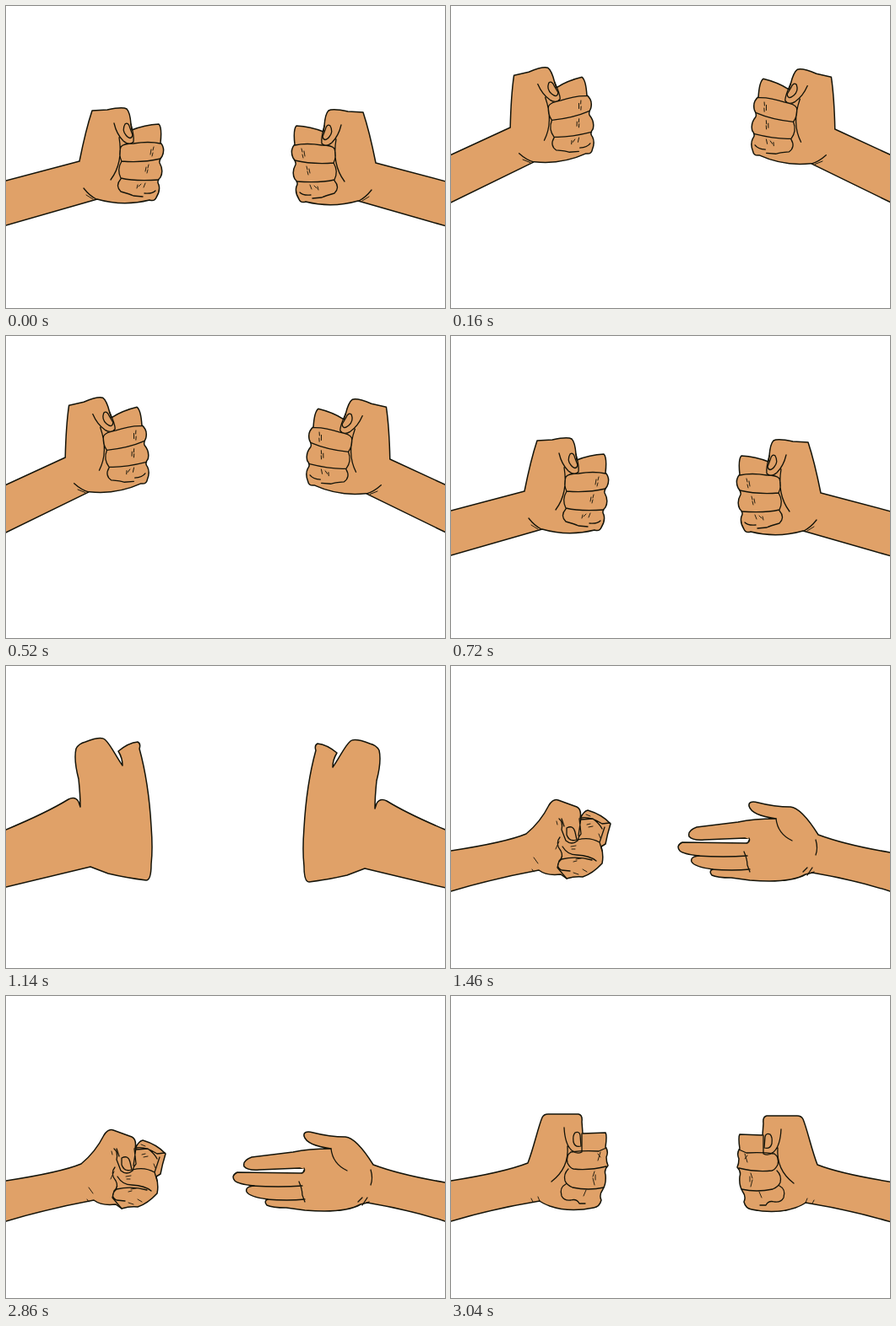
An HTML page for the animation above (3.12 s loop, 520x358 px).

```html
<!DOCTYPE html>
<html lang="en">
<head>
<meta charset="utf-8">
<title>Rock paper scissors</title>
<style>
html, body { margin: 0; width: 100%; height: 100%; overflow: hidden; background: #fff }
svg { display: block; width: 100%; height: 100% }
path { fill: none; stroke: #14140a; stroke-width: 1.3; stroke-linecap: round; stroke-linejoin: round }
.skin { fill: #e0a168; stroke-width: 1.5 }
.fine { stroke-width: .9 }
</style>
</head>
<body>
<svg viewBox="0 0 520 358">
<defs>
  <g id="rest">
    <path class="skin" d="M-60 223L0 207L87 184C91 164 96 142 102 124L120 123Q138 119 143 122Q147 126 148 140L149 147Q164 141 181 140Q185 144 183 162Q189 169 185 178Q181 183 182 186Q187 195 183 203Q178 207 181 212Q183 219 178 227Q176 232 170 230Q139 238 108 229L0 260L-60 278"/>
    <path d="M148 140Q152 155 151 161Q146 166 139 160Q131 152 128 139M134 156Q139 186 124 206M136 167Q139 163 151 163Q169 160 183 163M136 167Q133 176 137 184Q162 186 183 181M137 184Q131 194 136 204Q153 208 181 206M136 205Q129 213 136 220Q147 223 151 225L162 226M164 222Q173 223 177 219M107 229Q99 225 92 216"/>
    <path d="M141 140Q145 137 147 145L150 153Q148 160 142 153Q137 147 141 140"/>
    <path class="fine" d="M175 167L174 171M172 170L171 176M174 174L173 178M169 188L168 192M166 191L165 196M168 194L167 198M165 210L163 215M160 211L157 214M156 212L155 216M95 224L103 229"/>
  </g>
  <g id="down">
    <path class="skin" d="M-60 228L0 219Q63 209 91 198C98 180 103 156 108 144Q110 140 115 140L151 140Q156 141 155 149L156 163L183 162Q185 165 183 179Q187 184 184 191Q184 197 186 201Q181 206 183 212Q184 222 180 229Q175 236 178 242Q176 250 169 251Q140 257 117 249Q109 246 105 243Q50 252 0 267L-60 282"/>
    <path d="M155 163L155 185Q149 188 143 183Q135 176 134 156M138 178Q140 204 119 220M142 185Q156 183 175 184L184 180M142 185Q136 189 138 198Q141 204 145 205Q164 207 184 202M139 205Q133 211 135 219Q137 224 144 227Q163 231 181 227M136 223Q128 227 131 237Q134 243 142 242Q149 240 152 246L159 246"/>
    <path d="M147 162Q152 160 153 165L154 178Q147 180 145 173Q144 165 147 162"/>
    <path class="fine" d="M177 185L174 195M174 187L177 191M170 208L168 214M168 216L170 224M171 212L171 218M160 230L157 237M103 238L105 243M95 240L97 244"/>
  </g>
  <g id="smear">
    <path class="skin" d="M-60 218L0 194Q48 174 74 158Q82 154 86 161L88 167Q88 153 86 134Q80 111 83 98Q86 92 94 90Q112 83 117 87C124 93 130 107 138 118Q138 109 133 101Q145 91 156 90Q160 92 158 98Q169 138 172 190Q174 217 172 235Q172 254 166 254Q142 251 121 246L100 238L0 262L-60 276"/>
  </g>
  <g id="rock">
    <path class="skin" d="M-60 228L0 219Q65 209 89 199Q106 185 116 165Q121 157 127 159L149 167Q155 170 153 181Q157 172 162 171Q179 176 189 187Q185 200 183 211L178 214Q181 225 179 234Q168 246 156 250Q147 249 137 252L130 247Q113 249 104 242Q50 252 0 267L-60 282"/>
    <path d="M128 181Q133 185 131 194L136 207Q143 213 150 207Q151 202 154 199L152 181M131 181L134 190M137 192Q145 188 147 197L149 206Q140 209 137 200ZM151 201L154 180Q165 178 179 187L188 186M154 182L168 181Q176 187 179 193M150 206Q164 202 176 209L182 191M129 203Q123 210 130 219Q134 226 128 231L126 239L137 252M132 214Q138 224 149 224Q165 225 172 231M131 229Q149 225 167 230M131 229Q122 237 131 242L141 243M176 209L179 219"/>
    <path class="fine" d="M160 176L165 178M161 188L165 187M163 191L168 190M175 199L177 204M142 214L148 213M143 217L147 217M148 229L154 228M145 232L149 231M145 245L151 247M156 241L161 244M98 227L103 234M96 241L98 244M125 184L126 188M128 208L124 217"/>
  </g>
  <g id="paper" transform="translate(525 -2) scale(-1 1)">
    <path class="skin" d="M580 231L520 221Q467 212 435 200C425 184 413 168 402 167Q383 167 364 162Q352 159 353 166Q356 177 385 181Q358 181 340 185L291 191Q280 195 282 202Q286 207 300 206L348 204L353 206L350 210L274 209Q266 213 271 219Q275 223 294 225Q283 226 285 232Q288 238 310 241Q305 243 309 248Q315 251 332 251L354 254Q401 258 420 247L428 245Q476 253 520 267L580 283"/>
    <path d="M385 181Q387 199 404 207M432 206Q435 216 432 224M291 225Q324 227 351 225M308 241Q334 243 354 241M351 210Q355 207 353 204M347 220Q351 229 351 236L354 244M417 244L422 239M422 248L428 239M427 245L430 244"/>
    <path d="M346 205L353 205L351 209L345 208Z" style="fill:#fff;stroke:none"/>
  </g>
</defs>
<use id="left"/>
<g transform="translate(525 2) scale(-1 1)"><use id="right"/></g>
</svg>
<script>
const LOOP = 3120, BEAT = 360;
const left = document.getElementById('left'), right = document.getElementById('right');
const lift = angle => `rotate(${-angle} -150 260)`;
const narrow = 'translate(18 0) scale(.8 1)';

// [start ms, left hand, right hand, left transform, right transform]
const both = (at, hand, move = '') => [at, hand, hand, move, move];
const shake = [
  both(0, 'rest'), both(80, 'rest', lift(5)), both(160, 'rest', lift(10)),
  both(240, 'smear'), both(280, 'down')
];
const reveal = [
  both(1140, 'smear'), both(1180, 'down'),
  [1220, 'rock', 'paper', '', narrow], [1260, 'rock', 'paper', '', ''],
  [3000, 'rock', 'paper', '', narrow], both(3040, 'down')
];

function poseAt(t) {
  if (t >= 1140) return reveal.findLast(p => p[0] <= t);
  // The third lift is held before the reveal.
  const u = t < 2 * BEAT ? t % BEAT : Math.min(t - 2 * BEAT, 160);
  return shake.findLast(p => p[0] <= u);
}

function show(el, hand, move) {
  el.setAttribute('href', '#' + hand);
  el.setAttribute('transform', move);
}

let current;
function draw() {
  const pose = poseAt(performance.now() % LOOP);
  if (pose !== current) {
    current = pose;
    show(left, pose[1], pose[3]);
    show(right, pose[2], pose[4]);
  }
  requestAnimationFrame(draw);
}
draw();
</script>
</body>
</html>
```
